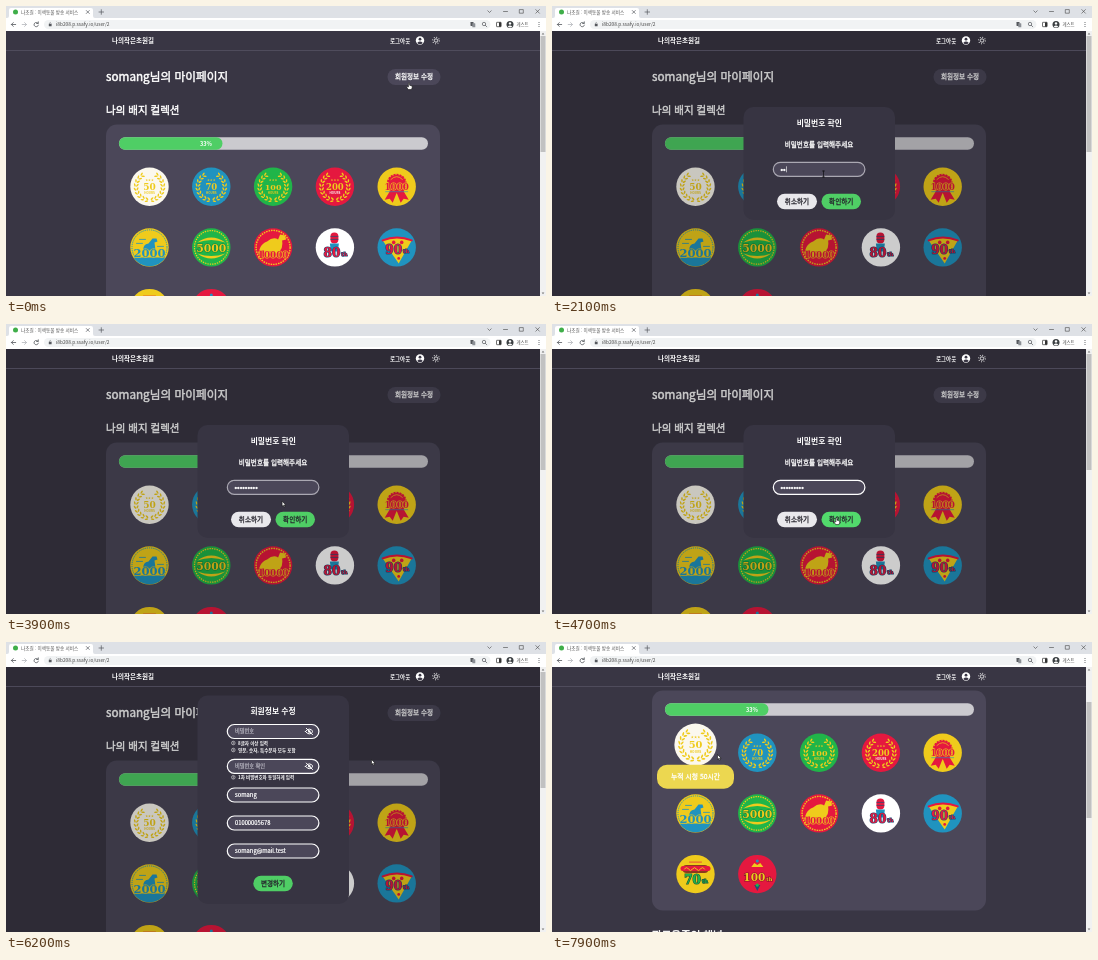
Write an HTML page that moves like this. It is 540 px wide and 290 px high and loops after 8000 ms.

```html
<!DOCTYPE html>
<html lang="ko">
<head>
<meta charset="utf-8">
<title>마이페이지</title>
<style>
html, body { margin: 0; width: 100%; height: 100%; overflow: hidden; background: #393644; }
svg { display: block; width: 540px; height: 290px; }
text { font-family: 'Noto Sans CJK KR', 'Noto Sans CJK', 'Noto Sans', sans-serif; white-space: pre; }
.slab { font-family: 'DejaVu Serif', 'Noto Serif', serif; }
.dots { font-family: 'Liberation Sans', Arial, sans-serif; }
</style>
</head>
<body>
<svg id="stage" viewBox="0 0 540 290"></svg>
<script>
const LOOP = 8000, SCROLL = 70;
const C = {
  page: '#393644', card: '#4b4759', modal: '#373442', green: '#4fce65',
  gold: '#efcb1c', red: '#e5183f', blue: '#2093bf', leaf: '#20b549',
  cream: '#fbf8ee', navy: '#1d4f78', white: '#fff'
};
const stage = document.getElementById('stage');

function el(parent, tag, attrs) {
  const node = document.createElementNS('http://www.w3.org/2000/svg', tag);
  for (const k in attrs) node.setAttribute(k, attrs[k]);
  parent.appendChild(node);
  return node;
}
const set = (node, k, v) => node.setAttribute(k, v);
const group = (p, attrs) => el(p, 'g', attrs);
const rect = (p, x, y, width, height, rx, fill, more) => el(p, 'rect', { x, y, width, height, rx, fill, ...more });
const disc = (p, cx, cy, r, fill, more) => el(p, 'circle', { cx, cy, r, fill, ...more });
const path = (p, d, fill, more) => el(p, 'path', { d, fill, ...more });
const line = (p, d, stroke, width = 0.8) => path(p, d, 'none', { stroke, 'stroke-width': width, 'stroke-linecap': 'round' });

// cy is the optical middle of the line; a thin outline makes the medium weight
function label(p, str, x, cy, size, more = {}) {
  const medium = !more['font-weight'] && { stroke: more.fill || C.white, 'stroke-width': size * 0.04 };
  const node = el(p, 'text', { x, y: cy + size * 0.37, 'font-size': size, fill: C.white, ...medium, ...more });
  node.textContent = str;
  return node;
}
const mid = (p, str, x, cy, size, more) => label(p, str, x, cy, size, { 'text-anchor': 'middle', ...more });

// ---------- badges ----------
function ring(p, r, color, width, dash) {
  disc(p, 0, 0, r, 'none', { stroke: color, 'stroke-width': width, ...(dash && { 'stroke-dasharray': dash }) });
}
function wreath(p, color) {
  for (const side of [-1, 1]) for (let i = 0; i < 9; i++) {
    const deg = 90 + side * (12 + i * 17), a = deg * Math.PI / 180;
    for (const [r, turn] of [[12.2, 35], [14.8, -25]])
      el(p, 'ellipse', {
        rx: 1.8, ry: 0.75, fill: color,
        transform: `translate(${r * Math.cos(a)} ${r * Math.sin(a)}) rotate(${deg + side * (90 + turn)})`
      });
  }
}
function num(p, str, y, size, fill, edge, x = 0) {
  mid(p, str, x, y, size, {
    class: 'slab', fill, 'font-weight': 700,
    ...(edge && { stroke: edge, 'stroke-width': 1.2, 'paint-order': 'stroke' })
  });
}
function nth(p, str, y, size, fill, edge) {
  num(p, str, y, size, fill, edge, -3);
  num(p, 'th', y + 2, 5, fill, edge, str.length * size * 0.35 + 1);
}
function laurel(p, str, size, ink, small) {
  wreath(p, ink);
  num(p, str, 0, size, ink);
  mid(p, 'HOURS', 0, 6, 3, { fill: small, 'font-weight': 700 });
  mid(p, '★ ★ ★', 0, -7, 2.4, { fill: ink });
}
const DINO = 'M-14 3Q-12-4-6-6Q0-11 5-8L7-13L12-12L13-8L9-7Q10 0 7 3L5 9H2L1 4H-4L-5 9H-9L-9 3Z';
const BADGES = [
  [C.cream, '누적 시청 50시간', p => laurel(p, '50', 9, C.gold, C.gold)],
  [C.blue, '누적 시청 70시간', p => laurel(p, '70', 8.5, C.gold, C.gold)],
  [C.leaf, '누적 시청 100시간', p => laurel(p, '100', 8, C.gold, C.gold)],
  [C.red, '누적 시청 200시간', p => laurel(p, '200', 8.5, C.gold, C.white)],
  [C.gold, '누적 시청 1000시간', p => {
    path(p, 'M-6 3L-12 13L-7 12L-4 16L0 6L4 16L7 12L12 13L6 3Z', C.red);
    disc(p, 0, -3, 9, C.red, { stroke: C.red, 'stroke-width': 2, 'stroke-dasharray': '2 1' });
    path(p, 'M-6-7Q0-13 6-7', 'none', { stroke: C.gold, 'stroke-width': 0.7 });
    num(p, '1000', 0, 8.8, C.red, C.gold);
    line(p, 'M-11 5H11', C.blue, 0.6);
  }],
  [C.gold, '누적 시청 2000시간', p => {
    path(p, 'M-16 10A18.9 18.9 0 0 0 16 10Z', C.blue);
    ring(p, 17.5, C.blue, 1, '1.2 1');
    path(p, 'M-6 3Q-7-3-1-4L3-9L7-9L8-6L5-5L6 3Z', C.blue);
    line(p, 'M-13-4H-7M8-1H14M-10-8H-4', C.blue, 0.8);
    num(p, '2000', 5.5, 11.5, C.blue, C.gold);
  }],
  [C.leaf, '누적 시청 5000시간', p => {
    ring(p, 16.8, C.gold, 1.2, '1.4 1');
    path(p, 'M-14-5Q0-15 14-5Q0-10-14-5ZM-14 6Q0 16 14 6Q0 11-14 6Z', C.gold);
    num(p, '5000', 0.5, 10.8, C.gold, '#15803a');
  }],
  [C.red, '누적 시청 10000시간', p => {
    ring(p, 17, C.gold, 1.4, '1.5 1');
    path(p, DINO, C.gold);
    num(p, '10000', 7.5, 8.8, C.red, C.gold);
  }],
  [C.white, '방송 80회 달성', p => {
    rect(p, -4.5, -15, 8, 11, 4, C.red);
    line(p, 'M-4-11H3M-4-8H3', C.navy, 0.7);
    path(p, 'M-5-4H4L3 4H-4Z', C.blue);
    nth(p, '80', 5, 12, C.red, C.navy);
  }],
  [C.blue, '방송 90회 달성', p => {
    path(p, 'M-14-7Q0-13 15-7L2 16Z', C.gold);
    line(p, 'M-14-7Q0-13 15-7', C.red, 2);
    disc(p, -3, -5, 1.8, C.red); disc(p, 5, -5, 1.8, C.red); disc(p, 2, 11, 1.4, C.red);
    nth(p, '90', 2, 12, C.red, C.navy);
  }],
  [C.gold, '방송 70회 달성', p => {
    rect(p, -13, -9, 26, 8, 4, '#8a3b1c');
    rect(p, -15, -8, 30, 5, 2.5, C.red);
    line(p, 'M-11-5Q-9-8-7-5T-3-5T1-5T5-5T9-5', C.gold, 1);
    nth(p, '70', 5, 12, C.leaf, '#24503a');
    line(p, 'M-6-12H6', C.red, 0.7);
  }],
  [C.red, '방송 100회 달성', p => {
    path(p, 'M-6-7L-3-11L0-9L3-11L6-7Z', C.gold);
    disc(p, 0, -13, 1.5, C.blue);
    nth(p, '100', 3, 10.5, C.gold, '#8e1030');
    path(p, 'M-3 11H3L0 17Z', C.navy);
    disc(p, 0, 11, 1.6, C.leaf);
  }]
];

// ---------- page ----------
rect(stage, 0, 0, 540, 290, 0, C.page);
const page = group(stage);
label(page, 'somang님의 마이페이지', 100, 71, 11.7);
rect(page, 381.5, 63, 53, 16, 8, C.card);
mid(page, '회원정보 수정', 408, 71, 6.6);
label(page, '나의 배지 컬렉션', 100, 104, 10.5);
rect(page, 100, 118.5, 334, 220, 11, C.card);
rect(page, 113, 131.3, 309, 12.5, 6.2, '#cbcacf');
rect(page, 113, 131.3, 103.5, 12.5, 6.2, C.green);
label(page, '33%', 206, 137.5, 5.6, { 'text-anchor': 'end', 'font-weight': 700 });
label(page, '팔로우중인 채널', 100, 363, 10.5);

const spots = BADGES.map((b, i) => ({ x: 143.5 + (i % 5) * 61.8, y: 180.7 + Math.floor(i / 5) * 60.7 }));
const medals = BADGES.map(([fill, , draw]) => {
  const g = group(page);
  disc(g, 0, 0, 19.2, fill);
  draw(g);
  return g;
});
const tips = BADGES.map(([, str]) => {
  const g = group(page);
  rect(g, -38.5, -12, 77, 24, 10, '#ecd750');
  mid(g, str, 0, 0, 6.8);
  return g;
});

const shade = rect(stage, 0, 25, 534, 265, 0, '#000');

// ---------- site header ----------
const header = group(stage);
rect(header, 0, 25, 534, 19.5, 0, C.page);
const headShade = rect(header, 0, 25, 534, 19.5, 0, '#000');
rect(header, 0, 44, 534, 0.7, 0, '#5a5668');
label(header, '나의작은초원길', 106, 34.5, 6.5, { 'font-weight': 700 });
label(header, '로그아웃', 384, 34.5, 5.5, { 'font-weight': 700 });
disc(header, 414, 34.5, 4.2, C.white);
disc(header, 414, 33.2, 1.4, C.page);
path(header, 'M411.2 37Q414 34.2 416.8 37Q414 39.4 411.2 37Z', C.page);
disc(header, 430, 34.5, 1.7, 'none', { stroke: C.white, 'stroke-width': 0.8 });
disc(header, 430, 34.5, 3.3, 'none', { stroke: C.white, 'stroke-width': 1.1, 'stroke-dasharray': '0.8 1.79' });

// ---------- dialogs ----------
const DARK = '#25232c', HINT = '#b9b7c2';
function field(p, cy, str, color, size) {
  const box = rect(p, 221.3, cy - 7, 91.6, 14, 7, C.card, { stroke: C.white, 'stroke-width': 1.2 });
  return { box, text: label(p, str, 229, cy, size, { fill: color }) };
}
function button(p, x, y, w, str, fill) {
  const box = rect(p, x, y, w, 15.5, 7.7, fill);
  mid(p, str, x + w / 2, y + 7.7, 6.6, { fill: DARK });
  return box;
}
const ask = group(stage);
rect(ask, 191.5, 101, 151.5, 113, 10, C.modal);
mid(ask, '비밀번호 확인', 267.3, 117.3, 7.8, { 'font-weight': 700 });
mid(ask, '비밀번호를 입력해주세요', 267, 139, 6.6);
const pass = field(ask, 163.3, '비밀번호', HINT, 5.2);
const dots = label(ask, '', 228.5, 163, 7.4, { class: 'dots' });
const caret = rect(ask, 229, 160.3, 0.6, 6, 0, C.white);
button(ask, 225, 187.7, 40, '취소하기', '#e9e8ec');
const okBox = button(ask, 269.5, 187.7, 39.5, '확인하기', C.green);

const form = group(stage);
rect(form, 191.5, 53.5, 151.5, 208.5, 10, C.modal);
mid(form, '회원정보 수정', 267, 69, 7.8, { 'font-weight': 700 });
field(form, 89.5, '비밀번호', HINT, 5.2);
field(form, 124.3, '비밀번호 확인', HINT, 5.2);
field(form, 153, 'somang', C.white, 5.8);
field(form, 181, '01000005678', C.white, 5.8);
field(form, 209, 'somang@mail.test', C.white, 5.8);
for (const y of [89.5, 124.3]) {
  line(form, `M299.5 ${y}Q303.3 ${y - 5} 307 ${y}Q303.3 ${y + 5} 299.5 ${y}Z`, C.white, 1);
  disc(form, 303.3, y, 1.2, C.white);
  line(form, `M300.3 ${y - 3.2}L306.5 ${y + 3.2}`, C.white, 1);
}
for (const [y, str] of [[101, '8글자 이상 입력'], [108, '영문, 숫자, 특수문자 모두 포함'], [135.3, '1차 비밀번호와 동일하게 입력']]) {
  disc(form, 227.3, y, 1.8, 'none', { stroke: C.white, 'stroke-width': 0.5 });
  line(form, `M227.3 ${y - 0.9}V${y + 0.9}`, C.white, 0.5);
  label(form, str, 232, y, 4.5, { 'font-weight': 700 });
}
button(form, 247.3, 233.7, 39.5, '변경하기', C.green);

// ---------- browser frame ----------
const INK = '#55585d';
const chromeText = (str, x, y, size, fill) => label(stage, str, x, y, size, { fill, 'font-weight': 400 });
rect(stage, 0, 0, 540, 13, 0, '#dee1e6');
path(stage, 'M1 12Q3 12 3 10V4Q3 2 5 2H85Q87 2 87 4V10Q87 12 89 12V13H1Z', C.white);
rect(stage, 0, 12, 540, 13, 0, C.white);
disc(stage, 9.5, 6, 2.5, '#3fae49');
chromeText('나초길 : 이색동물 방송 서비스', 15, 6, 4.6, '#555');
line(stage, 'M80.3 4.5L83.3 7.5M83.3 4.5L80.3 7.5', INK, 0.7);
line(stage, 'M93 6H97.6M95.3 3.7V8.3', INK, 0.7);
line(stage, 'M481.8 4.8L483.5 6.5L485.2 4.8M497.5 5.5H501.5M513.7 3.6H517.3V7.2H513.7ZM529.8 3.6L533.4 7.2M533.4 3.6L529.8 7.2', '#444', 0.6);
line(stage, 'M9.7 18.5H5.5M7.3 16.6L5.4 18.5L7.3 20.4', INK);
line(stage, 'M16.2 18.5H20.4M18.6 16.6L20.5 18.5L18.6 20.4', '#b4b7bb');
line(stage, 'M32 17.2A2.2 2.2 0 1 0 32.4 19.2M32.3 15.8V17.5H30.6', INK);
rect(stage, 38, 14, 446.5, 9, 4.5, '#f1f3f4');
rect(stage, 42.8, 18, 2.8, 2.3, 0.3, INK);
line(stage, 'M43.4 18V17.1Q44.2 15.8 45 17.1V18', INK, 0.5);
chromeText('i8b208.p.ssafy.io/user/2', 50, 18.5, 4.8, '#444');
rect(stage, 464.5, 16, 3, 4, 0.4, INK);
rect(stage, 466.3, 17.3, 3, 4, 0.4, '#8b8f95');
disc(stage, 478, 18, 1.7, 'none', { stroke: INK, 'stroke-width': 0.7 });
line(stage, 'M479.3 19.3L480.8 20.8', INK, 0.7);
rect(stage, 490.5, 16.3, 4.6, 4.4, 0.4, 'none', { stroke: '#333', 'stroke-width': 0.7 });
rect(stage, 493, 16.3, 2.1, 4.4, 0, '#333');
disc(stage, 504, 18.5, 3.5, '#3c4043');
disc(stage, 504, 17.4, 1.2, C.white);
path(stage, 'M501.7 20.6Q504 18.2 506.3 20.6Q504 22.4 501.7 20.6Z', C.white);
chromeText('게스트', 510.5, 18.5, 4.4, '#555');
for (const y of [16.5, 18.5, 20.5]) disc(stage, 533, y, 0.55, INK);

rect(stage, 534, 25, 6, 265, 0, '#f1f1f1');
path(stage, 'M535.7 28.4L537 26.8L538.3 28.4Z', '#777');
path(stage, 'M535.7 286.6L537 288.2L538.3 286.6Z', '#777');
const thumb = rect(stage, 534.5, 30, 5, 116, 0, '#c1c1c1');

// ---------- pointer ----------
const pointer = group(stage);
const edge = { stroke: '#111', 'stroke-width': 0.6, 'stroke-linejoin': 'round' };
const shapes = {
  arrow: path(pointer, 'M0 0V5L1.2 4L2 5.8L2.9 5.4L2.1 3.7H3.6Z', C.white, edge),
  hand: path(pointer, 'M-.6 0Q0-.7.6 0V2.2L3.2 3V4.8L2.4 6.6H-.8L-2.4 4Q-2 3-.6 4Z', C.white, edge),
  beam: line(pointer, 'M-1-3H1M0-3V3M-1 3H1', '#0d0d10', 0.7)
};

// ---------- motion ----------
const TRACK = [
  [0, 403, 77], [380, 403, 77], [980, 273.5, 160], [1500, 273.5, 160], [1800, 271.5, 168],
  [3600, 271.5, 168], [4350, 284.5, 194], [5200, 284.5, 194], [6000, 365.5, 117.5],
  [6950, 365.5, 117.5], [7750, 165.5, 112.5], [8000, 165.5, 112.5]
];
const SHAPE_AT = [[0, 'hand'], [300, 'arrow'], [900, 'beam'], [3780, 'arrow'], [4150, 'hand'], [4950, 'arrow']];
const HOVERS = [[4, 6655, 7060], [3, 7130, 7320], [2, 7320, 7480], [1, 7480, 7580], [0, 7590, 9000]];

const clamp = v => Math.max(0, Math.min(1, v));
const ease = v => v * v * (3 - 2 * v);
const ramp = (t, from, to) => clamp((t - from) / (to - from));
const show = (node, on) => set(node, 'visibility', on ? 'visible' : 'hidden');

function pointerAt(t) {
  const i = Math.max(1, TRACK.findIndex(k => k[0] > t));
  const [t0, x0, y0] = TRACK[i - 1], [t1, x1, y1] = TRACK[i];
  const k = ease(ramp(t, t0, t1));
  return [x0 + (x1 - x0) * k, y0 + (y1 - y0) * k];
}
function hoverOf(i, t) {
  const h = HOVERS.find(([n]) => n === i);
  if (!h) return 0;
  const peak = ramp(Math.min(t, h[2]), h[1], h[1] + 250);
  return clamp(peak - Math.max(0, t - h[2]) / 250);
}

function render(t) {
  const scroll = SCROLL * ease(ramp(t, 6480, 6680));
  set(page, 'transform', `translate(0 ${-scroll})`);
  set(thumb, 'y', 30 + scroll * 30 / SCROLL);

  const open = ramp(t, 250, 400), shut = ramp(t, 6380, 6460);
  const dim = 0.2 * open * (1 - shut);
  set(shade, 'opacity', dim);
  set(headShade, 'opacity', dim);
  set(ask, 'opacity', t < 4950 ? open : 0);
  set(form, 'opacity', t < 4950 ? 0 : 1 - shut);

  const typed = Math.max(0, Math.min(9, Math.floor((t - 1700) / 170)));
  const focused = t > 1400 && t < 4600;
  dots.textContent = '•'.repeat(typed);
  show(pass.text, typed === 0);
  set(pass.box, 'stroke', focused ? '#aaa8b2' : C.white);
  const typing = t > 1700 && t < 3400;
  show(caret, focused && (typing || t % 1000 < 500));
  set(caret, 'x', 229 + typed * 2.59);
  set(okBox, 'fill', t > 4150 ? '#52da6c' : C.green);

  spots.forEach(({ x, y }, i) => {
    const h = hoverOf(i, t), lift = y - 8 * h;
    set(medals[i], 'transform', `translate(${x} ${lift}) scale(${1 + 0.1 * h})`);
    set(tips[i], 'transform', `translate(${x} ${lift + 29 + 3 * h}) scale(${h})`);
    show(tips[i], h > 0);
  });

  const kind = SHAPE_AT.filter(([at]) => at <= t).pop()[1];
  for (const k in shapes) show(shapes[k], k === kind);
  set(pointer, 'transform', `translate(${pointerAt(t).join(' ')})`);
}

const start = performance.now();
function tick() {
  render((performance.now() - start) % LOOP);
  requestAnimationFrame(tick);
}
tick();
</script>
</body>
</html>
```
